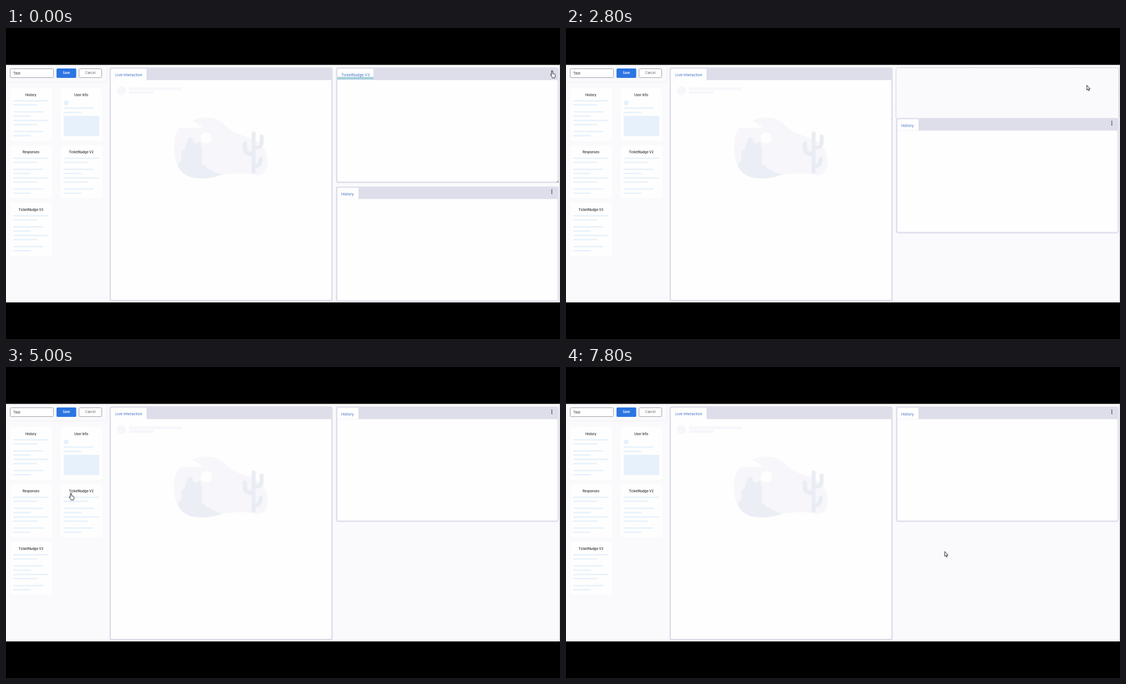
An HTML page that plays this animation: 998 px wide and 561 px high, repeating every 8 s.

```html
<!DOCTYPE html>
<html lang="en">
<head>
<meta charset="utf-8">
<title>Layout editor</title>
<style>
html, body { margin: 0; width: 100%; height: 100%; overflow: hidden; background: #000; }
svg { display: block; font-family: Inter, "Open Sans", sans-serif; }
.title { font-size: 5.75px; font-weight: 500; fill: #25272b; text-anchor: middle; }
.tab { font-size: 6.7px; fill: #3a68c4; }
.bar { fill: none; stroke: #e7f1fb; stroke-width: 2.6; }
.card { fill: #fefefe; }
.frame { fill: #dddeea; }
.body { fill: #fefefe; }
.pointer path { fill: #fff; stroke: #24242c; stroke-width: 1; stroke-linejoin: round; }

.cursor, .history, .first, .menu, .hover, .grip, .resize, .slot, .hand, .arrow, .drag {
  animation: 8s step-end infinite;
}
.cursor { animation-name: travel; }
.history { animation-name: rise; }
.first { animation-name: first; }
.menu { animation-name: menu; }
.hover { animation-name: hover; }
.grip { animation-name: grip; }
.resize { animation-name: resize; }
.slot { animation-name: slot; }
.hand { animation-name: hand; }
.arrow { animation-name: arrow; }
.drag { animation-name: drag; }

@keyframes travel {
  0% { transform: translate(984px, 77.5px); }
  25% { transform: translate(984px, 77.5px); animation-timing-function: steps(2); }
  30% { transform: translate(938px, 103px); }
  37.5% { transform: translate(938px, 103px); animation-timing-function: steps(5); }
  50% { transform: translate(632.5px, 93.5px); animation-timing-function: steps(5); }
  62.5% { transform: translate(117px, 227.5px); animation-timing-function: steps(2); }
  67.5% { transform: translate(138px, 248px); animation-timing-function: steps(4); }
  77.5% { transform: translate(274px, 309px); animation-timing-function: steps(6); }
  92.5%, 100% { transform: translate(682px, 332.5px); }
}
@keyframes rise {
  0% { transform: translateY(214.5px); }
  35% { transform: translateY(91px); }
  37.5%, 100% { transform: none; }
}
@keyframes first { 0% { opacity: 1; } 35%, 100% { opacity: 0; } }
@keyframes menu { 0% { opacity: 0; } 22.5% { opacity: 1; } 35%, 100% { opacity: 0; } }
@keyframes hover { 0% { fill: #fdfdfe; } 27.5%, 100% { fill: #f0eff3; } }
@keyframes grip { 0% { opacity: 0; } 25%, 100% { opacity: 1; } }
@keyframes resize { 0% { opacity: 0; } 37.5% { opacity: 1; } 52.5%, 100% { opacity: 0; } }
@keyframes slot { 0% { opacity: 0; } 35% { opacity: 1; } 37.5%, 100% { opacity: 0; } }
@keyframes hand { 0% { opacity: 1; } 35% { opacity: 0; } 60% { opacity: 1; } 65%, 100% { opacity: 0; } }
@keyframes arrow { 0% { opacity: 0; } 35% { opacity: 1; } 60% { opacity: 0; } 65%, 100% { opacity: 1; } }
@keyframes drag { 0% { opacity: 0; } 65% { opacity: 1; } 92.5%, 100% { opacity: 0; } }
</style>
</head>
<body>
<svg width="998" height="561" viewBox="0 0 998 561">
  <defs>
    <path id="lines" class="bar" d="M5 23H69M5 30.5H48M5 43H59M5 50.5H37M5 58.5H69M5 66H48M5 78.5H59M5 86H37"/>
    <g id="blank"><rect class="card" width="75" height="95" rx="3"/></g>
    <g id="card"><use href="#blank"/><use href="#lines"/></g>
    <g id="dots" fill="#26283a">
      <circle cx="983.3" cy="77.8" r=".95"/><circle cx="983.3" cy="80.8" r=".95"/><circle cx="983.3" cy="83.8" r=".95"/>
    </g>
    <g id="panel">
      <rect class="frame" x="594.5" y="71" width="401" height="208.5" rx="4"/>
      <rect class="body" x="597" y="94" width="396.5" height="183" rx="1"/>
    </g>
    <path id="corner" d="M995.5 274.5V279H991Z" fill="#a9abb8"/>
    <filter id="shadow" x="-20%" y="-40%" width="140%" height="200%">
      <feDropShadow dx="0" dy="1.5" stdDeviation="1.6" flood-color="#000" flood-opacity=".2"/>
    </filter>
  </defs>

  <rect width="998" height="561"/>
  <rect y="66.5" width="998" height="428.5" fill="#fafafd"/>

  <!-- toolbar -->
  <path d="M0 97H182V67" fill="none" stroke="#f0f0f5"/>
  <rect x="7.5" y="73.5" width="78" height="16" rx="2" fill="#fefefe" stroke="#a0a2a9"/>
  <text x="13" y="83.5" font-size="6.4" fill="#25272b">Test</text>
  <rect x="91" y="73" width="35.5" height="17" rx="2" fill="#2b75e2"/>
  <text x="108.8" y="83.2" font-size="5.6" font-weight="600" fill="#fff" text-anchor="middle">Save</text>
  <rect x="131.5" y="73.5" width="41" height="16" rx="2" fill="#fefefe" stroke="#a0a2a9"/>
  <text x="152" y="83.2" font-size="5.6" fill="#5c5f68" text-anchor="middle">Cancel</text>

  <!-- widget cards -->
  <use href="#card" x="8" y="108.3"/>
  <use href="#blank" x="98.5" y="108.3"/>
  <use href="#card" x="8" y="212"/>
  <use href="#card" x="98.8" y="212"/>
  <use href="#card" x="8" y="315.8"/>
  <g fill="#e7f1fb">
    <circle cx="108.5" cy="135.2" r="4.5"/>
    <rect x="104" y="158.5" width="64" height="36.5"/>
  </g>
  <path class="bar" d="M104 144.5H157M104 152.3H135.5"/>
  <g class="title">
    <text x="45" y="122.6">History</text>
    <text x="135.5" y="122.6">User Info</text>
    <text x="45" y="226.2">Responses</text>
    <text x="135.5" y="226.2">TicketNudge V2</text>
    <text x="45" y="330">TicketNudge V3</text>
  </g>

  <!-- live interaction -->
  <rect class="frame" x="186.5" y="71" width="402" height="422.5" rx="4"/>
  <path class="body" d="M189 94V76Q189 73.5 191.5 73.5H253V94H586V490.5H189Z"/>
  <text class="tab" x="197" y="87">Live Interaction</text>
  <g fill="#f6f6fb">
    <circle cx="208" cy="113" r="8"/>
    <rect x="221.5" y="107.3" width="94.5" height="5" rx="1"/>
    <rect x="221.5" y="114" width="44.5" height="5" rx="1"/>
    <path d="M336 167C350 160 375 158 390 171C402 182 411 190 430 195C455 201 470 215 471 240C471 255 464 266 455 265C430 260 405 262 388 265C370 272 345 274 330 268C310 261 302 238 303 215C303 198 307 183 315 180H354C350 174 342 172 336 167Z"/>
  </g>
  <circle cx="361" cy="198" r="10.3" fill="#fefefe"/>
  <path fill="#ebeff5" d="M309 248L316 238V222L321 219L323 216V209L327 207V200L332 198L336 199L337 206L341 208L342 211L346 206H350L353 222V245C364 254 375 261 390 264.5C370 272 345 274 330 268C320 264 313 257 309 248Z"/>
  <g fill="none" stroke="#e9edf3" stroke-linecap="round">
    <path stroke-width="7" d="M446 190V259"/>
    <path stroke-width="7" d="M460.5 195.5V207Q460.5 215 449 216.5"/>
    <path stroke-width="8" d="M430.5 209V218Q430.5 227 445 227.5"/>
    <path stroke-width="7" d="M459 236Q459 247 449 250"/>
  </g>

  <!-- right column -->
  <path class="slot" d="M594.5 162V76Q594.5 71.5 599 71.5H991Q995.5 71.5 995.5 76V162" fill="none" stroke="#a5a8b4" stroke-width=".8" stroke-dasharray="2 1.4"/>
  <g class="first">
    <use href="#panel"/>
    <path class="body" d="M597 94V76Q597 73.5 599.5 73.5H662V94Z"/>
    <rect x="597" y="88.3" width="65" height="4.8" fill="#a9cfde"/>
    <text class="tab" x="604" y="87">TicketNudge V3</text>
    <path class="grip" d="M625.5 90.2H630.5M625.5 91.8H630.5" stroke="#7795b0" stroke-width=".8"/>
    <use href="#corner"/>
    <use href="#dots"/>
  </g>
  <g class="history">
    <use href="#panel"/>
    <path class="body" d="M597 94V76Q597 73.5 599.5 73.5H635V94Z"/>
    <text class="tab" x="604" y="87">History</text>
    <use href="#dots"/>
  </g>
  <use class="resize" href="#corner"/>
  <path d="M997.3 66.5V495" stroke="#cfd0d8" stroke-width="1.2"/>

  <g class="menu">
    <rect x="976.8" y="74" width="13.2" height="13.7" rx="1.5" fill="#e6ecf8" stroke="#5a90e6"/>
    <use href="#dots"/>
    <rect class="hover" x="915" y="90" width="76" height="20.5" rx="1.5" filter="url(#shadow)"/>
    <text x="920" y="102" font-size="6.6" fill="#55575f">Delete</text>
  </g>

  <g class="cursor">
    <use class="drag" href="#lines" x="-39" y="-37" stroke-opacity=".45"/>
    <g class="pointer">
      <g class="hand">
        <path d="M-1.1 1A1.1 1.1 0 0 1 1.1 1V4.9L4.6 5.7Q5.9 6.1 5.7 7.5L5.2 10.3L4.6 12.5H.2L-.3 10.9L-3 7.8Q-3.2 6.2-1.9 6.5L-1.1 7.4Z"/>
      </g>
      <g class="arrow">
        <path d="M.3.3V9L2.3 7.2L3.6 10.2L5 9.6L3.7 6.7H6.2Z"/>
      </g>
      <g class="drag">
        <path d="M2.8 9.5V12H5.5M5.5 10.5H9.8V14.7H5.5Z"/>
        <path d="M6.5 12.6H8.8M7.6 11.5V13.8"/>
      </g>
    </g>
  </g>
</svg>
</body>
</html>
```
